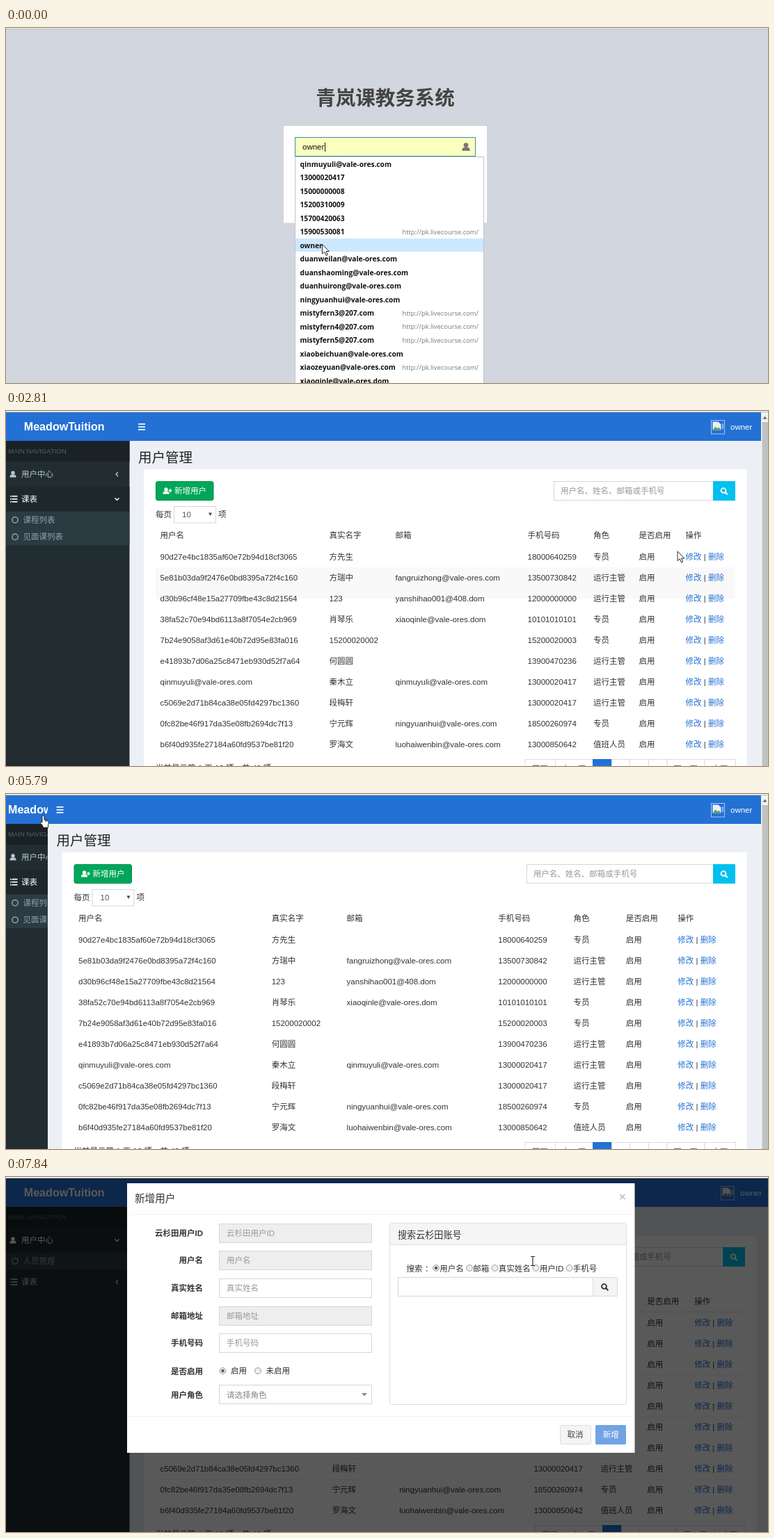
An HTML page for the animation above (7990 ms loop, 1095 by 511 pixels).

```html
<!DOCTYPE html>
<html lang="zh-CN">
<head>
<meta charset="utf-8">
<title>用户管理</title>
<style>
html, body { margin: 0; width: 100%; height: 100%; overflow: hidden; background: #fff; }
svg { display: block; }
text { font-family: "Liberation Sans", "Noto Sans CJK SC", "Noto Sans CJK", sans-serif; }
.ui { font-family: "Open Sans", "Noto Sans", sans-serif; }
</style>
</head>
<body>
<svg id="stage" width="1095" height="511" viewBox="0 0 1095 511"></svg>
<script>
const LOOP = 7990;
const BLUE = '#2371d4', LINE = '#d2d6de', INK = '#333';
const USER = 'owner', BRAND = 'MeadowTuition', LOGIN_TITLE = '青岚课教务系统', SCHOOL = '云杉田';
const mail = (name, end = 'com') => `${name}@vale-ores.${end}`;

// The picture changes in bursts: first change, last change, number of changes.
const bursts = [[280, 430, 2], [740, 1130, 4], [1440, 2220, 7], [2810, 3740, 8], [3890, 4160, 3],
  [4560, 5490, 8], [5640, 6360, 6], [6640, 7570, 8], [7690, 7840, 2]];
const steps = bursts.flatMap(([a, b, n]) => Array.from({ length: n }, (_, i) => a + (b - a) * i / (n - 1)));
const snap = t => steps.reduce((last, s) => s <= t + 0.01 ? s : last, 0);

const clamp = v => Math.min(1, Math.max(0, v));
const phase = (t, start, length) => clamp((t - start) / length);
const smooth = p => p * p * (3 - 2 * p);
const swing = p => 0.5 - Math.cos(Math.PI * p) / 2;

// Drawing helpers; text is placed by its vertical centre.
const rect = (x, y, w, h, fill, extra = '') =>
  `<rect x="${x}" y="${y}" width="${w}" height="${h}" fill="${fill}" ${extra}/>`;
const box = (x, y, w, h, fill, stroke, r = 0) =>
  rect(x + 0.5, y + 0.5, w - 1, h - 1, fill, `stroke="${stroke}" rx="${r}"`);
const text = (x, y, s, fill = INK, size = 11.5, extra = '') =>
  `<text x="${x}" y="${y + size * 0.36}" fill="${fill}" font-size="${size}" ${extra}>${s}</text>`;
const path = (d, fill, extra = '') => `<path d="${d}" fill="${fill}" ${extra}/>`;
const circle = (x, y, r, fill, extra = '') => `<circle cx="${x}" cy="${y}" r="${r}" fill="${fill}" ${extra}/>`;
const at = (x, y, body, more = '') => `<g transform="translate(${x} ${y}) ${more}">${body}</g>`;
const clip = (x, y, w, h, body) => `<svg x="${x}" y="${y}" width="${w}" height="${h}">${body}</svg>`;
const BOLD = 'font-weight="700"', MIDDLE = 'text-anchor="middle"', END = 'text-anchor="end"';

const person = (x, y, fill, k = 1) => at(x, y,
  circle(0, -2, 2.7, fill) + path('M-4.6 4.6Q-4.6.6-1.5.6H1.5Q4.6.6 4.6 4.6Z', fill), `scale(${k})`);
const lens = (x, y, fill) => at(x, y,
  circle(-1, -1, 3.4, 'none', `stroke="${fill}" stroke-width="1.9"`) +
  path('M1.6 1.6L4.8 4.8', 'none', `stroke="${fill}" stroke-width="2.2"`));
const chevron = (x, y, turn, fill) => at(x, y,
  path('M1.5-3L-1.5 0L1.5 3', 'none', `stroke="${fill}" stroke-width="1.4"`), `rotate(${turn})`);
const bars = (x, y, w, fill) => [-4, 0, 4].map(d => rect(x, y + d - 0.8, w, 1.7, fill)).join('');
const radio = (x, y, on) => circle(x, y, 4.4, '#eee', 'stroke="#999"') + (on ? circle(x, y, 2.2, '#555') : '');

const suggestions = [mail('qinmuyuli'), '13000020417', '15000000008', '15200310009', '15700420063', '15900530081',
  USER, mail('duanweilan'), mail('duanshaoming'), mail('duanhuirong'), mail('ningyuanhui'),
  'mistyfern3@207.com', 'mistyfern4@207.com', 'mistyfern5@207.com',
  mail('xiaobeichuan'), mail('xiaozeyuan'), mail('xiaoqinle', 'dom')];
const withUrl = [5, 11, 12, 13, 15];

const STAFF = '专员', LEAD = '运行主管', DUTY = '值班人员';
const heads = ['用户名', '真实名字', '邮箱', '手机号码', '角色', '是否启用', '操作'];
const users = [
  ['90d27e4bc1835af60e72b94d18cf3065', '方先生', '', '18000640259', STAFF],
  ['5e81b03da9f2476e0bd8395a72f4c160', '方瑞中', mail('fangruizhong'), '13500730842', LEAD],
  ['d30b96cf48e15a27709fbe43c8d21564', '123', 'yanshihao001@408.dom', '12000000000', LEAD],
  ['38fa52c70e94bd6113a8f7054e2cb969', '肖琴乐', mail('xiaoqinle', 'dom'), '10101010101', STAFF],
  ['7b24e9058af3d61e40b72d95e83fa016', '15200020002', '', '15200020003', STAFF],
  ['e41893b7d06a25c8471eb930d52f7a64', '何圆圆', '', '13900470236', LEAD],
  [mail('qinmuyuli'), '秦木立', mail('qinmuyuli'), '13000020417', LEAD],
  ['c5069e2d71b84ca38e05fd4297bc1360', '段梅轩', '', '13000020417', LEAD],
  ['0fc82be46f917da35e08fb2694dc7f13', '宁元辉', mail('ningyuanhui'), '18500260974', STAFF],
  ['b6f40d935fe27184a60fd9537be81f20', '罗海文', mail('luohaiwenbin'), '13000850642', DUTY]];
// Column offset in the narrow table, and its share of any extra width.
const columns = [[6.5, 0], [249.5, 0.295], [344.5, 0.405], [534.5, 0.641], [629, 0.757], [694.5, 0.84], [761.5, 0.905]];

function login(t) {
  const open = t < 740, pressed = t >= 1440, hover = t >= 1000;
  let out = rect(0, 2, 1095, 509, LINE) +
    text(545, 100.5, LOGIN_TITLE, '#444', 28.5, `${BOLD} ${MIDDLE}`) +
    rect(399, 141, 292, 139.5, '#fff') +
    box(415, 157, 260, 28, '#faffbd', pressed ? LINE : '#3c8dbc') + text(426, 171, USER, '#111') +
    person(661, 171, '#777', 1.25) +
    box(415, 197, 260, 28, '#faffbd', LINE) +
    [0, 1, 2, 3, 4].map(i => circle(428 + i * 4.1, 211, 1.7, '#111')).join('') +
    rect(655.5, 210, 10.5, 6.5, '#777', 'rx="1"') +
    path('M658 210V208.5A2.7 2.7 0 0 1 663.4 208.5V210', 'none', 'stroke="#777" stroke-width="1.6"') +
    box(415, 237, 260, 28, hover ? '#367fa9' : '#3c8dbc', pressed ? '#204d74' : '#367fa9') +
    text(545, 251, '登 录', '#fff', 11.5, MIDDLE);
  if (t < 280 || (t >= 740 && !pressed)) out += rect(458, 165, 1, 13, '#111');
  if (open) {
    out += box(415, 185, 272, 340, '#fff', '#bcc5d0') + rect(416, 303, 270, 19, '#cce8ff');
    suggestions.forEach((s, i) => {
      const y = 196 + 19.5 * i;
      out += text(422.5, y, s, '#111', 10.2, `class="ui" ${BOLD}`);
      if (withUrl.includes(i)) out += text(679, y, 'http://pk.livecourse.com/', '#777', 9.4, `class="ui" ${END}`);
    });
  }
  return out;
}

function subMenu(y, h, names, hot) {
  if (h < 0.5) return '';
  return clip(0, y, 178, h, rect(0, 0, 178, h, '#2c3b41') + names.map((s, i) => {
    const c = 12.2 + 24.5 * i, fill = s === hot ? '#fff' : '#8aa4af';
    return circle(13, c, 4.2, 'none', `stroke="${fill}" stroke-width="1.5"`) + text(24.5, c, s, fill);
  }).join(''));
}

function sidebar(t, width, mini) {
  const slide = swing(phase(t, 6630, 500)), done = t >= 7140, turn = 90 * smooth(phase(t, 7130, 350));
  const grey = '#b8c7ce', H = 35.75;
  let y = 0, out = rect(0, 0, 178, 468, '#222d32');
  const item = (name, icon, active, angle) => {
    const c = y + 17.9, fill = active ? '#fff' : grey;
    if (active) out += rect(0, y, 178, H, '#1e282c');
    out += icon(c, fill);
    if (!mini) out += text(22, c, name, fill, 11.5, active ? 'font-weight="500"' : '') + chevron(159.5, c, angle, fill);
    y += H;
  };
  if (!mini) {
    out += rect(0, 0, 178, 30, '#1a2226') + text(3, 14.5, 'MAIN NAVIGATION', '#4b646f', 9.5);
    y = 30;
  }
  item('用户中心', (c, f) => person(10, c, f), t >= 6640, -turn);
  if (!mini) {
    out += subMenu(y, 24.5 * slide, ['人员管理']);
    y += 24.5 * slide;
  }
  item('课表', (c, f) => bars(8.5, c, 8, f) + bars(6, c, 1.7, f), !done, turn - 90);
  if (!mini) out += subMenu(y, 49 * (1 - slide), ['课程列表', '见面课列表'], t > 3600 && t < 3950 ? '见面课列表' : '');
  return clip(0, 43, width, 468, out);
}

function table(t, left, right) {
  const extra = right - left - 833, wide = t >= 7510;
  const col = columns.map(([x, k]) => left + x + k * extra);
  let out = '';
  if (t < 4560) out += rect(left, 225, 833, 45, '#f9f9f9') + (t > 3300 ? rect(left, 193.5, 110, 1.5, '#eee') : '');
  if (wide) {
    out += rect(left, 193.5, right - left, 1.8, '#eceff3');
    for (let y = 225; y < 500; y += 30) out += rect(left, y, right - left, 1, '#f1f1f1');
  }
  heads.forEach((s, i) => out += text(col[i], 178.5, s));
  if (t < 1950) return out;
  users.forEach((u, r) => {
    const y = 210 + 30 * r;
    [...u, '启用'].forEach((s, i) => { if (s) out += text(col[i], y, s); });
    out += text(col[6], y, `<tspan fill="${BLUE}">修改</tspan> | <tspan fill="${BLUE}">删除</tspan>`);
  });
  return out;
}

function pager(right) {
  const edges = [302.5, 259, 205, 178, 152, 125, 98.5, 44.5, 0].map(d => right - d);
  return ['首页', '上一页', '1', '2', '3', '4', '下一页', '末页'].map((s, i) => {
    const x = edges[i], w = edges[i + 1] - x, on = s === '1';
    return box(x, 501, w + 1, 28, on ? BLUE : '#fff', on ? BLUE : '#ddd') +
      text(x + w / 2, 515, s, on ? '#fff' : '#666', 11.5, MIDDLE);
  }).join('');
}

function dashboard(t) {
  const folded = smooth(phase(t, 4500, 300)) - smooth(phase(t, 5697, 300));
  const side = 177.5 - 147.5 * folded, mini = t >= 4560 && t < 5640;
  const shift = t >= 7510 ? 14 : 0, left = side + 37.5, right = 1048 + shift;
  const searchW = 261 + (right - left - 833) / 3, searchX = right - searchW;
  let out = rect(0, 2, 1095, 509, '#ecf0f5') +
    text(side + 12.5, 66.5, '用户管理', '#222', 19.5) +
    rect(side + 20.5, 84, right + 16.5 - side - 20.5, 427, '#fff');

  out += box(left, 101, 83.5, 28, t >= 7430 ? '#008d4c' : '#00a65a', '#008d4c', 2.5) +
    person(left + 15, 115, '#fff') +
    path(`M${left + 18.5} 114.5h5M${left + 21} 112v5`, 'none', 'stroke="#fff" stroke-width="1.7"') +
    text(left + 27, 115, '新增用户', '#fff') +
    text(left, 148.5, '每页') + box(left + 26, 137, 61, 24.5, '#fff', LINE) +
    text(left + 38, 149, '10', '#555') + path(`M${left + 76} 146.5h5l-2.5 4.5z`, '#444') +
    text(left + 90, 148.5, '项');

  out += box(searchX, 101, searchW - 31, 28, '#fff', LINE) +
    text(searchX + 10, 115, '用户名、姓名、邮箱或手机号', '#999') +
    rect(right - 32, 101, 32, 28, '#00c0ef') + lens(right - 16, 115.5, '#fff');

  out += table(t, left, right) + text(left, 514, '当前显示第 1 页 10 项，共 40 项') + pager(right);

  const logoX = Math.max(3, (side - 11) / 2 + 1 - 58.5);
  out += rect(0, 2, 1095, 41, BLUE) +
    clip(0, 2, side, 41, mini ? text(9.5, 21, 'MT', '#fff', 14, `${BOLD} ${MIDDLE}`)
      : text(logoX, 20.7, BRAND, '#fff', 16.1, BOLD)) +
    bars(side + 12.5, 22.7, 10, '#fff');
  out += at(shift, 0, box(1013, 13, 20, 20.5, 'none', '#a9c6ee') +
    path('M1015.5 15.5h8l4 4v8h-12z', '#e8f0fb') + path('M1015.5 27.5l4-5 3 3 2-2 3 4z', '#5d9c59') +
    path('M1030 18v8', 'none', 'stroke="#fff"') + text(1041, 23, USER, '#fff'));
  out += sidebar(t, side, mini);

  if (!shift) out += rect(1085, 2, 10, 509, '#f1f1f1') + rect(1086.5, 16, 8.5, 495, '#c1c1c1') +
    path('M1087.5 11.5h6l-3-4z', '#666');
  else out += rect(0, 2, 1095, 509, '#000', `opacity="${0.5 * phase(t, 7510, 150)}"`) + modal(t);
  return out;
}

function modal(t) {
  const top = 26 - 98 * (1 - phase(t, 7665, 300)) ** 2, fade = phase(t, 7665, 150);
  if (!fade) return '';
  let out = rect(174, 9, 729.5, 388, '#fff') +
    text(185, 31, '新增用户', INK, 14.6) + text(886, 28, '×', '#c4c4c4', 17, `${BOLD} ${MIDDLE}`) +
    rect(174, 53.5, 729.5, 1, '#f0f0f0') + rect(174, 344, 729.5, 1, '#f0f0f0');

  [[`${SCHOOL}用户ID`, 1], ['用户名', 1], ['真实姓名', 0], ['邮箱地址', 1], ['手机号码', 0]].forEach(([s, locked], i) => {
    const y = 80.5 + 39.7 * i;
    out += text(283, y, s, INK, 11.5, `${BOLD} ${END}`) +
      box(306, Math.round(y - 14), 220, 28, locked ? '#eee' : '#fff', LINE) + text(317, y, s, '#999');
  });
  out += text(283, 279.5, '是否启用', INK, 11.5, `${BOLD} ${END}`) +
    radio(311.5, 279, true) + text(323, 279, '启用') + radio(362, 279) + text(373.5, 279, '未启用') +
    text(283, 313.5, '用户角色', INK, 11.5, `${BOLD} ${END}`) +
    box(306, 299, 220, 28, '#fff', LINE) + text(317, 313.5, '请选择角色', '#888') + path('M511 311h8l-4 4.5z', '#888');

  out += box(551, 66, 341, 262, '#fff', '#ddd', 3) + rect(552, 67, 339, 30, '#f5f5f5') +
    rect(551, 97, 341, 1, '#ddd') + text(563, 83, `搜索${SCHOOL}账号`, INK, 13.1) + text(575.5, 132, '搜索 ：');
  [[618, '用户名'], [666, '邮箱'], [702.5, '真实姓名'], [761.5, '用户ID'], [809.5, '手机号']].forEach(([x, s], i) =>
    out += radio(x, 131, i === 0) + text(x + 5.2, 132, s));
  out += box(563, 144, 281, 28, '#fff', LINE) + box(843, 144, 36, 28, '#f4f4f4', '#ddd') + lens(860.5, 158.5, INK) +
    box(796, 357, 45, 28, '#f4f4f4', '#ddd', 2) + text(818, 371, '取消', '#444', 11.5, MIDDLE) +
    rect(847, 357, 44, 28, '#72a3e3', 'rx="2"') + text(869.3, 371, '新增', '#fff', 11.5, `${MIDDLE} font-weight="500"`);
  // The dialog layer brings its own shade on top of the backdrop.
  return `<g opacity="${fade}">${rect(0, 2, 1095, 509, '#000', 'opacity=".3"')}${at(0, top - 9, out)}</g>`;
}

const pointers = {
  arrow: path('M0 0V13.6L3.2 10.7L5.5 16L7.7 15L5.5 10H9.8Z', '#fff', 'stroke="#111" stroke-width=".9"'),
  hand: path('M-1.5 9.5V1.4A1.5 1.5 0 0 1 1.5 1.4V6L6.5 7Q8.3 7.5 8 10L7 14V17.3H-.5V15L-4.2 10.8Q-4.4 8-1.5 10ZM3.2 6.5V9M5.4 7V9.3',
    '#fff', 'stroke="#111" stroke-width=".9"'),
  beam: path('M-3-6.5H-.8L0-5.8L.8-6.5H3M0-5.8V5.8M-3 6.5H-.8L0 5.8L.8 6.5H3', 'none', 'stroke="#222" stroke-width="1.1"')
};
// Time, tip position, and the pointer shape from that time on.
const track = [[0, 454.5, 311.5, 'arrow'], [700, 454.5, 311.5, 'arrow'], [1130, 537, 256, 'arrow'],
  [1900, 537, 256, 'arrow'], [2220, 1018, 204, 'arrow'], [2680, 1018, 204, 'arrow'], [3450, 320, 178, 'arrow'],
  [3600, 150, 150, 'hand'], [3740, 100, 171, 'hand'], [3780, 100, 171, 'hand'], [4160, 195, 26, 'hand'],
  [4800, 195, 26, 'hand'], [5490, 53.5, 31, 'hand'], [5800, 53.5, 31, 'hand'], [6360, 162.5, 85, 'hand'],
  [6920, 162.5, 85, 'hand'], [7150, 195, 92, 'arrow'], [7430, 278, 109, 'arrow'], [7580, 278, 109, 'arrow'],
  [7840, 757, 121, 'beam'], [LOOP, 757, 121, 'beam']];

function pointer(t) {
  const i = track.findLastIndex(k => k[0] <= t + 0.01);
  const [a, x, y, shape] = track[i], [b, x2, y2] = track[i + 1];
  const p = smooth(phase(t, a, b - a));
  return at(x + (x2 - x) * p, y + (y2 - y) * p, pointers[shape]);
}

const stage = document.getElementById('stage');
const start = performance.now();
let shown = -1;

function tick() {
  const t = snap((performance.now() - start) % LOOP);
  if (t !== shown) {
    shown = t;
    stage.innerHTML = (t < 1830 ? login(t) : dashboard(t)) + rect(0, 0, 1095, 1, '#fff') +
      rect(0, 1, 1095, 1, '#b8b8b8') + pointer(t);
  }
  requestAnimationFrame(tick);
}
tick();
</script>
</body>
</html>
```
